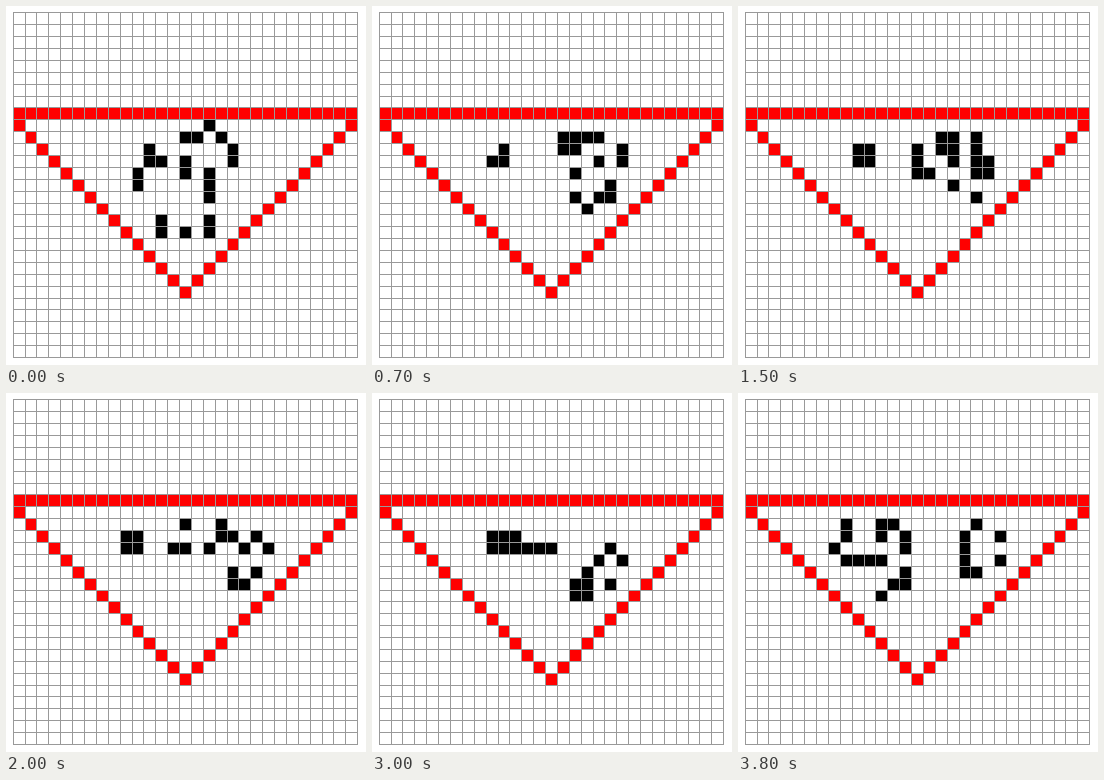
These frames come from a looping animation (360x359 px, 3.9 s). An HTML page:

```html
<!DOCTYPE html>
<html lang="en">
<head>
<meta charset="utf-8">
<title>Life in a triangle</title>
<style>
  html, body { margin: 0; width: 100%; height: 100%; overflow: hidden; background: #fff; }
  svg { display: block; width: 360px; height: 359px; }
</style>
</head>
<body>
<svg viewBox="0 0 360 359" shape-rendering="crispEdges">
  <path id="grid" fill="#999"/>
  <path id="wall" fill="#f00"/>
  <path id="life" fill="#000"/>
</svg>
<script>
const N = 29, PITCH = 11.88, STEP = 100, STEPS = 39;
const lineX = i => Math.round(6.7 + i * PITCH);
const lineY = i => Math.round(6.45 + i * PITCH);
const box = (x, y, w, h) => `M${x} ${y}h${w}v${h}h${-w}z`;

// One cell fills the space between its grid lines.
function cell(r, c) {
  const x = lineX(c) + 1, y = lineY(r) + 1;
  return box(x, y, lineX(c + 1) - x, lineY(r + 1) - y);
}

function gridPath() {
  const x = lineX(0), y = lineY(0);
  const w = lineX(N) - x + 1, h = lineY(N) - y + 1;
  let d = '';
  for (let i = 0; i <= N; i++) {
    d += box(lineX(i), y, 1, h) + box(x, lineY(i), w, 1);
  }
  return d;
}

function wallPath() {
  let d = '';
  for (let c = 0; c < N; c++) {
    d += cell(8, c) + cell(9 + Math.min(c, N - 1 - c), c);
  }
  return d;
}

// Live columns by row
const seed = {
  9: [16], 10: [14, 15, 17], 11: [11, 18], 12: [11, 12, 14, 18],
  13: [10, 14, 16], 14: [10, 16], 15: [16], 17: [12, 16], 18: [12, 14, 16]
};

// Cells that touch the wall always stay dead.
const isFree = (r, c) => r > 9 && c >= r - 6 && c <= 34 - r;

function next(live) {
  const out = new Set();
  for (let r = 10; r < N - 1; r++) {
    for (let c = 1; c < N - 1; c++) {
      if (!isFree(r, c)) continue;
      const k = r * N + c;
      let n = 0;
      for (const row of [k - N, k, k + N]) {
        for (let j = row - 1; j <= row + 1; j++) {
          if (j !== k && live.has(j)) n++;
        }
      }
      if (n === 3 || (n === 2 && live.has(k))) out.add(k);
    }
  }
  return out;
}

const toPath = live =>
  [...live].map(k => cell(Math.floor(k / N), k % N)).join('');

let live = new Set();
for (const r in seed) for (const c of seed[r]) live.add(r * N + c);

const states = [];
for (let i = 0; i < STEPS; i++) {
  states.push(toPath(live));
  live = next(live);
}

const $ = id => document.getElementById(id);
$('grid').setAttribute('d', gridPath());
$('wall').setAttribute('d', wallPath());

let shown = -1;
function draw(t) {
  const i = Math.floor(t / STEP) % STEPS;
  if (i !== shown) {
    $('life').setAttribute('d', states[i]);
    shown = i;
  }
}

function tick() {
  draw(performance.now());
  requestAnimationFrame(tick);
}
tick();
</script>
</body>
</html>
```
